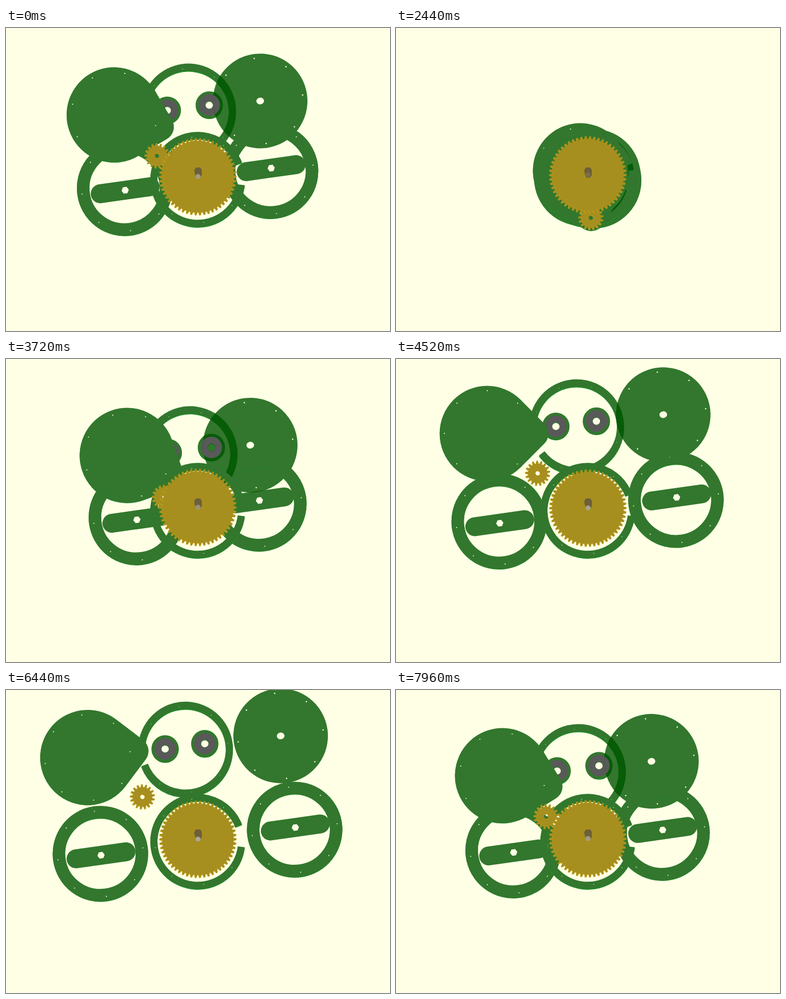
An HTML page without scripts that plays this animation: 753 px wide and 593 px high, repeating every 8 s.

```html
<!DOCTYPE html>
<html lang="en">
<head>
<meta charset="utf-8">
<title>Exploding gear box</title>
<style>
  @property --a { syntax: "<angle>"; inherits: true; initial-value: 0deg; }
  @property --q { syntax: "<number>"; inherits: true; initial-value: 0.25; }

  html, body { margin: 0; width: 100%; height: 100%; overflow: hidden; background: #ffffe5; }

  /* --q: 0 = fully apart, 1 = fully together */
  svg {
    display: block; width: 753px; height: 593px;
    color: #32772d;
    --edge: #238a2b;
    --u: calc((1 + sin(var(--a))) / 2);
    --q: calc(var(--u) * var(--u));
    --r: -8; --dr: 0; --k: 0;
    animation: cycle 8s steps(200) infinite;
  }
  @keyframes cycle { from { --a: 0deg; } to { --a: 360deg; } }

  /* part: starts at x,y and travels by dx,dy; k bends the travel for depth */
  .p {
    --t: calc(var(--q) * (1 + var(--k) * (var(--q) - 1)));
    transform: translate(calc((var(--x) + var(--dx) * var(--t)) * 1px),
                         calc((var(--y) + var(--dy) * var(--t)) * 1px));
  }
  .undo {
    transform: translate(calc((var(--x) + var(--dx) * var(--t)) * -1px),
                         calc((var(--y) + var(--dy) * var(--t)) * -1px));
  }
  .s { transform: rotate(calc((var(--r) + var(--dr) * var(--q)) * 1deg)); }
  .e { color: var(--edge); }
  .dark { color: #075c07; --edge: #075c07; }
  .gold { color: #a68f1f; }
  .rim { color: #d2a90f; }
  .pin { opacity: calc(1 - .85 * var(--q)); }

  .fill { fill: currentColor; fill-rule: evenodd; }
  .line { fill: none; stroke: currentColor; }
</style>
</head>
<body>
<svg viewBox="0 0 753 593">
  <defs>
    <mask id="screws" maskUnits="userSpaceOnUse" x="-130" y="-130" width="260" height="260">
      <rect x="-130" y="-130" width="260" height="260" fill="#fff"/>
      <circle r="84" fill="none" stroke="#000" stroke-width="2.4" pathLength="800"
              stroke-dasharray="3.6 96.4" stroke-dashoffset="1.8"/>
    </mask>
    <clipPath id="disc"><circle r="92.7"/></clipPath>

    <g id="drop" mask="url(#screws)">
      <path class="fill" d="M65.4-66L112-19.2A27 27 0 0 1 112 19.2L65.4 66A93 93 0 1 1 65.4-66z"/>
    </g>
    <g id="plate" mask="url(#screws)">
      <path class="fill" d="M-92.7 0a92.7 92.7 0 1 1 185.4 0a92.7 92.7 0 1 1-185.4 0z
                            M-7.5 0a7.5 6.6 0 1 0 15 0a7.5 6.6 0 1 0-15 0z"/>
    </g>
    <g id="ring" mask="url(#screws)">
      <circle class="line" r="81.3" stroke-width="24.6"/>
    </g>
    <g id="open" mask="url(#screws)">
      <circle class="line" r="86" stroke-width="14" pathLength="360"
              stroke-dasharray="332 28" transform="rotate(15)"/>
    </g>
    <path id="bar" class="fill" d="M-49.5-18.5h99a18.5 18.5 0 0 1 0 37h-99a18.5 18.5 0 0 1 0-37z
                                   M7.2 0L3.6 6.2h-7.2L-7.2 0l3.6-6.2h7.2z"/>
    <g id="bearing">
      <circle class="line e" cy="1" r="17" stroke-width="19"/>
      <circle class="line" r="17" stroke-width="19.4"/>
      <circle r="14.3" fill="none" stroke="#595959" stroke-width="13.4"/>
    </g>

    <!-- teeth taper in three steps -->
    <g id="wheel" class="line">
      <circle r="70" fill="currentColor" stroke="none"/>
      <g stroke-width="2.2">
        <circle r="70.8" pathLength="5400" stroke-dasharray="64 36" stroke-dashoffset="32"/>
        <circle r="72.6" pathLength="5400" stroke-dasharray="50 50" stroke-dashoffset="25"/>
        <circle r="74.4" pathLength="5400" stroke-dasharray="36 64" stroke-dashoffset="18"/>
      </g>
    </g>
    <g id="pinion" class="line">
      <circle r="11.7" stroke-width="14.4"/>
      <g stroke-width="2.2">
        <circle r="19.6" pathLength="1700" stroke-dasharray="62 38" stroke-dashoffset="31"/>
        <circle r="21.4" pathLength="1700" stroke-dasharray="48 52" stroke-dashoffset="24"/>
        <circle r="23.3" pathLength="1700" stroke-dasharray="34 66" stroke-dashoffset="17"/>
      </g>
    </g>
  </defs>

  <!-- upper right plate -->
  <g class="p" style="--x:538.7;--y:89.6;--dx:-161;--dy:213">
    <use href="#plate" class="s"/>
  </g>

  <!-- lower rings -->
  <g class="p" style="--x:185;--y:320.3;--dx:190.5;--dy:-29">
    <g class="e" transform="translate(0 .8)"><use href="#ring" class="s"/></g>
    <use href="#ring" class="s"/>
  </g>
  <g class="p" style="--x:186.2;--y:323.5;--dx:190;--dy:-24">
    <use href="#bar" class="s"/>
  </g>
  <g class="p" style="--x:566.2;--y:273;--dx:-189.7;--dy:26.5">
    <g class="e" transform="translate(0 .8)"><use href="#ring" class="s"/></g>
    <use href="#ring" class="s"/>
  </g>

  <!-- parts that darken where they cross the plate -->
  <g id="over">
    <g class="p" style="--x:567.5;--y:269;--dx:-190;--dy:21">
      <use href="#bar" class="s"/>
    </g>
    <g class="p" style="--x:352;--y:115.6;--dx:24;--dy:188;--r:172;--dr:-180">
      <g class="e" transform="translate(0 2)"><use href="#open" class="s"/></g>
      <use href="#open" class="s"/>
    </g>
    <g class="p" style="--x:312;--y:115;--dx:17;--dy:184">
      <use href="#bearing"/>
    </g>
    <g class="p" style="--x:389.8;--y:104.8;--dx:35;--dy:184">
      <use href="#bearing"/>
    </g>
  </g>
  <g class="p dark" clip-path="url(#disc)" style="--x:538.7;--y:89.6;--dx:-161;--dy:213">
    <g class="undo"><use href="#over"/></g>
  </g>

  <!-- fixed middle ring -->
  <g transform="translate(376 296.3)">
    <g class="e" transform="translate(0 1.6)"><use href="#open" class="s"/></g>
    <use href="#open" class="s"/>
  </g>

  <!-- upper left cover -->
  <g class="p" style="--x:160;--y:131.8;--dx:214.5;--dy:157;--k:.04;--dr:90">
    <g class="e" transform="translate(0 .7)"><use href="#drop" class="s"/></g>
    <use href="#drop" class="s"/>
  </g>

  <!-- gears -->
  <g class="p" style="--x:267.6;--y:208.8;--dx:122.5;--dy:173;--k:.07">
    <g class="rim" transform="translate(-.6 .8)"><use href="#pinion" class="s"/></g>
    <g class="gold"><use href="#pinion" class="s"/></g>
  </g>
  <g class="p" style="--x:376.5;--y:292;--dx:0;--dy:-5;--r:0">
    <g class="rim" transform="translate(-.6 .8)"><use href="#wheel" class="s"/></g>
    <g class="gold"><use href="#wheel" class="s"/></g>
  </g>
  <path d="M372 273h9l3 5v10l-4 5h-7l-3-9-1-5z" fill="#6d5f38"/>
  <g class="p" style="--x:376.5;--y:291.8;--dx:0;--dy:-5">
    <circle class="pin" r="4.8" fill="#aca89a"/>
  </g>
</svg>
</body>
</html>
```
